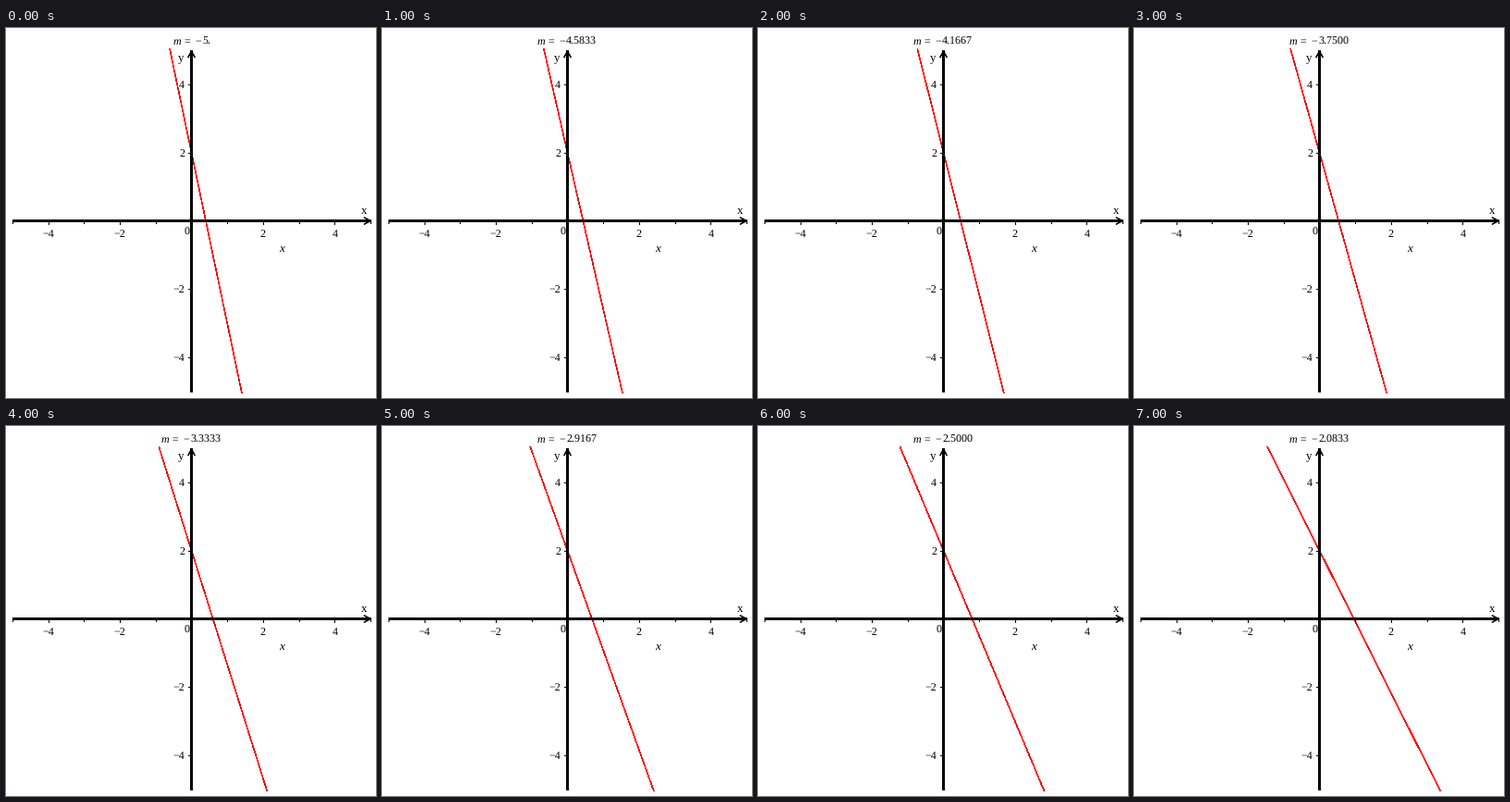
These frames come from a looping animation (400 by 400 pixels, 8000 ms). A matplotlib script:

```python
import matplotlib.pyplot as plt
from matplotlib.animation import FuncAnimation
from matplotlib.patches import Rectangle

plt.rcParams.update({
    "text.hinting": "none",
    "font.family": "Liberation Serif",
})

SIZE, DPI = 400, 100
PT = 72 / DPI                  # points per pixel
X0, Y0 = 200.5, 208.5          # origin in pixels
UX, UY = 38.7, 36.95           # pixels per unit
LIMIT, INTERCEPT = 5, 2
REACH = 5.03                   # the line runs slightly past the axis
FRAMES, INTERVAL = 8, 1000

fig = plt.figure(figsize=(SIZE / DPI, SIZE / DPI), dpi=DPI, facecolor="white")
ax = fig.add_axes([0, 0, 1, 1])
ax.set_xlim(0, SIZE)
ax.set_ylim(SIZE, 0)
ax.axis("off")


def px(x):
    return X0 + UX * x


def py(y):
    return Y0 - UY * y


def bar(x, y, w, h):
    ax.add_patch(Rectangle((x, y), w, h, fc="black", lw=0, aa=False, zorder=3))


def label(x, y, text, ha="center", italic=False, size=12):
    return ax.text(x, y, text, ha=ha, va="baseline", fontsize=size * PT,
                   style="italic" if italic else "normal", zorder=4)


def number(n):
    return str(n).replace("-", "\u2212")


def arrow(xs, ys):
    ax.plot(xs, ys, color="black", lw=1.6 * PT, zorder=3,
            solid_joinstyle="miter")


# Axes with arrowheads
bar(7, 207, 388, 3)
bar(199, 24, 3, 370)
arrow([387.5, 394, 387.5], [205, 208.5, 212])
arrow([197, 200.5, 204], [31.5, 25, 31.5])

# Ticks and their numbers
for n in range(-LIMIT, LIMIT + 1):
    if n == 0:
        continue
    major = n % 2 == 0
    bar(round(px(n)), 210, 1, 3 if major else 2)
    if major:
        bar(197, round(py(n)), 2, 1)
        label(px(n), 226, number(n))
        label(193, round(py(n)) + 4, number(n), ha="right")

label(195.5, 224, "0")
label(387, 201, "x", size=13)
label(189.5, 36, "y", size=13)
label(298, 242, "x", italic=True, size=13)

# Without antialiasing every touched pixel is filled, so a thin stroke suffices
line, = ax.plot([], [], color="red", lw=0.5 * PT, aa=False, zorder=2)

# Title pieces and their offsets from its left edge
title = [(label(0, 18, s, ha="left", italic=s == "m"), dx)
         for s, dx in (("m", 0), ("=", 11), ("\u2212", 23), ("", 31))]


def draw(k):
    m = -5 + 5 * k / 12
    ys = (REACH, -REACH)
    line.set_data([px((y - INTERCEPT) / m) for y in ys], [py(y) for y in ys])
    left = 181 if k == 0 else 168
    for part, dx in title:
        part.set_x(left + dx)
    title[-1][0].set_text("5." if k == 0 else f"{-m:.4f}")
    return [line] + [part for part, _ in title]


anim = FuncAnimation(fig, draw, frames=FRAMES, interval=INTERVAL,
                     repeat=True, repeat_delay=0)
plt.show()
```
